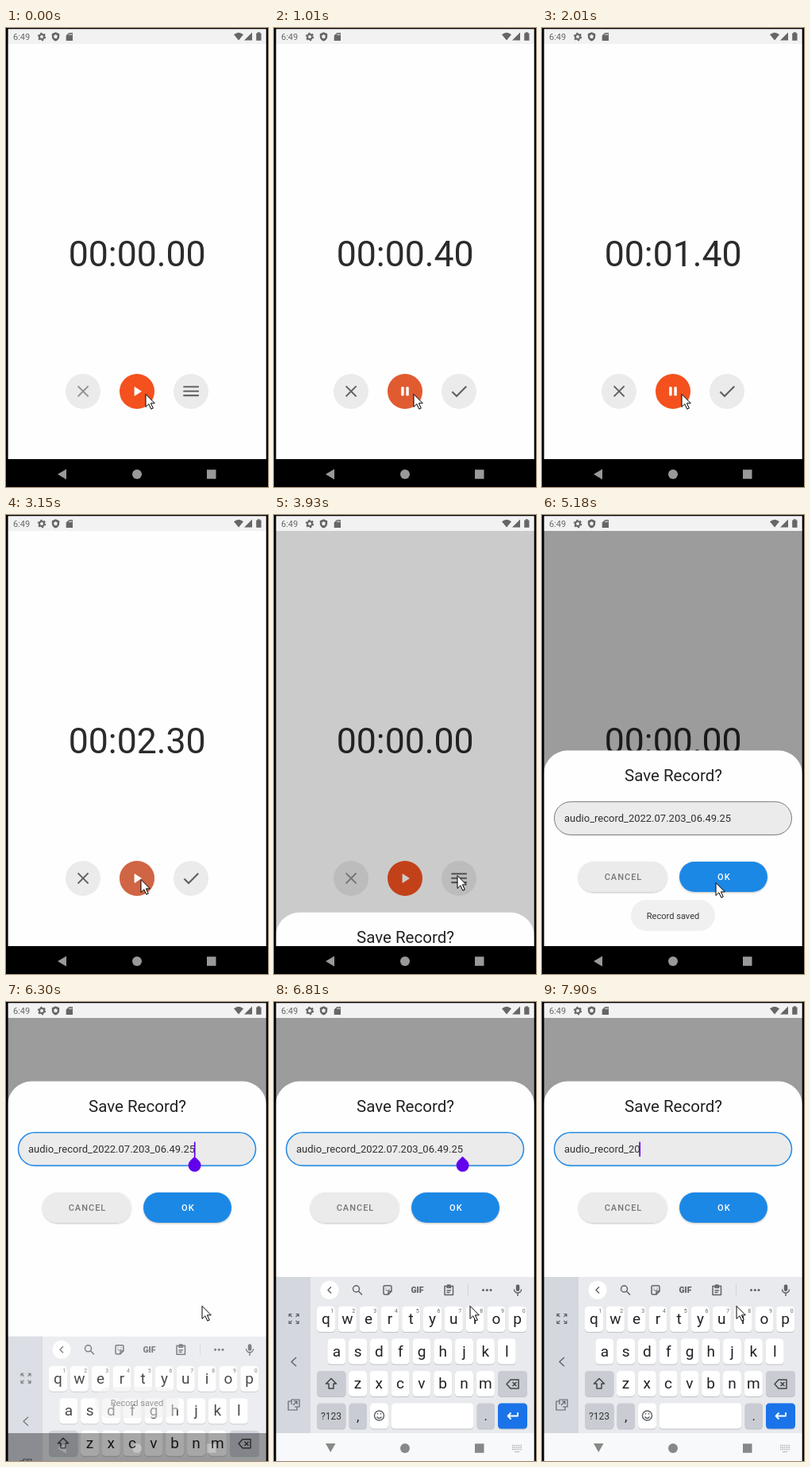
These frames come from a looping animation (330x576 px, 8 s). An HTML page:

```html
<!DOCTYPE html>
<html lang="en">
<head>
<meta charset="utf-8">
<title>Voice recorder</title>
<style>
html, body { margin: 0; width: 100%; height: 100%; overflow: hidden; background: #000; }
svg { display: block; width: 330px; height: 576px; font-family: Roboto, sans-serif; }
.mid { text-anchor: middle; }
.btn { font-size: 11px; font-weight: 500; letter-spacing: 1px; }
.line { fill: none; stroke: #5f6368; stroke-width: 1.5; stroke-linejoin: round; }
</style>
</head>
<body>
<svg viewBox="0 0 330 576">
  <defs>
    <filter id="soft" x="-10%" y="-20%" width="120%" height="150%">
      <feDropShadow dx="0" dy="1" stdDeviation="0.9" flood-opacity="0.25"/>
    </filter>
    <clipPath id="stage"><rect x="2" y="20" width="326" height="521"/></clipPath>
  </defs>
  <rect width="330" height="576" fill="#000"/>
  <g clip-path="url(#stage)">
    <rect x="2" y="20" width="326" height="521" fill="#fefefe"/>
    <text id="clock" class="mid" x="165.2" y="298.5" font-size="44.6" fill="#2b2b2b">00:00.00</text>

    <circle cx="97" cy="456" r="22" fill="#ebebeb"/>
    <path id="close" d="M90.6 449.4l13 13m0-13l-13 13" fill="none" stroke-width="2"/>
    <circle cx="165" cy="456" r="22" fill="#f4511e"/>
    <circle id="ripple" cx="165" cy="456" r="22" fill="#8a8a8a"/>
    <path id="play" d="M162 450.6v10.8l8.4-5.4z" fill="#fff" stroke="#fff" stroke-width=".8" stroke-linejoin="round"/>
    <g id="pause" fill="#fff">
      <rect x="160.2" y="450.3" width="3.5" height="11.2" rx="1.2"/>
      <rect x="166.3" y="450.3" width="3.5" height="11.2" rx="1.2"/>
    </g>
    <circle cx="233" cy="456" r="22" fill="#ebebeb"/>
    <path id="menu" d="M223.3 450.3h19.6m-19.6 5.4h19.6m-19.6 5.4h19.6" stroke="#666" stroke-width="2.1"/>
    <path id="check" d="M224.4 456.4l5.6 5.6 12.2-12.2" fill="none" stroke="#606060" stroke-width="2.1"/>

    <rect id="dim" x="2" y="20" width="326" height="521"/>

    <g id="sheet">
      <path d="M2 600V30.6A30 30 0 0 1 32 .6H298A30 30 0 0 1 328 30.6V600z" fill="#fefefe"/>
      <text class="mid" x="165.5" y="38.6" font-size="20.5" fill="#222">Save Record?</text>
      <rect id="field" x="15.5" y="64.8" width="299" height="41.6" rx="20.8" fill="#ebebeb"/>
      <text id="name" x="28" y="90.3" font-size="13" fill="#303030"></text>
      <g filter="url(#soft)">
        <rect x="46" y="140" width="111.5" height="38" rx="19" fill="#ebebeb"/>
        <rect x="173" y="140" width="111" height="38" rx="19" fill="#1e88e5"/>
      </g>
      <text class="mid btn" x="102.5" y="163.2" fill="#777">CANCEL</text>
      <text class="mid btn" x="229.3" y="163.2" fill="#fff">OK</text>
      <g id="caret" fill="#6200ee">
        <rect id="bar" x="-1.2" y="76.5" width="1.7" height="18.5"/>
        <path id="handle" d="M-.5 94.7l5.66 5.66a8 8 0 1 1 -11.32 0z"/>
      </g>
    </g>
  </g>

  <g id="status" fill="#666">
    <rect x="2" y="1" width="326" height="19" fill="#f2f2f2"/>
    <text x="9" y="15" font-size="11">6:49</text>
    <circle cx="45" cy="11" r="3" fill="none" stroke="#666" stroke-width="2"/>
    <circle cx="45" cy="11" r="4.5" fill="none" stroke="#666" stroke-width="1.5" stroke-dasharray="2.3 2.412"/>
    <path d="M62.5 5.3l4.7 2v3.4c0 2.7-2 5-4.7 5.8-2.7-.8-4.7-3.1-4.7-5.8V7.3z"/>
    <path d="M62.5 8l2.4 1.8-.8 3.2h-3.2l-.8-3.2z" fill="#f2f2f2"/>
    <path d="M79.3 6h4.7v10h-8.3V9.4z"/>
    <path d="M79.8 7.2v2m1.5-2v2m1.5-2v2" stroke="#f2f2f2" stroke-width=".8"/>
    <path d="M287 8.2q6-5 12 0l-6 7.3zM310 5.5v10h-10zM316.8 5.3h3v1.2h1.7v9.2h-6.3V6.5h1.6z"/>
  </g>

  <g id="keys"></g>

  <g id="nav">
    <rect x="2" y="541" width="326" height="35"/>
    <path d="M76 553.5v13l-11-6.5zM253 554.2h11.5v11.5h-11.5z" fill="#999"/>
    <circle cx="165" cy="560" r="6" fill="#999"/>
  </g>

  <g id="toast">
    <rect x="112" y="483" width="106" height="39" rx="19.5" fill="#f0f0f0"/>
    <text id="note" class="mid" x="165" y="507" font-size="11.1" fill="#333">Record saved</text>
  </g>
  <path id="pointer" d="M.5.5v16l3.8-3.6 3 6.3 2.5-1.1-2.9-6.2h4.9z" fill="#fff" stroke="#000" stroke-width="1"/>
  <path d="M0 0h330v576h-2.3V1.3H2.6V576H0z"/>
</svg>
<script>
const $ = id => document.getElementById(id);
const show = (id, on) => $(id).setAttribute('visibility', on ? 'visible' : 'hidden');
const fade = (id, a) => $(id).setAttribute('opacity', Math.max(0, Math.min(1, a)));
const move = (id, x, y) => $(id).setAttribute('transform', `translate(${x} ${y})`);

// Keyboard, laid out at its resting place
const key = (x, y, w, fill = '#fff') =>
  `<rect x="${x}" y="${y - 15.5}" width="${w}" height="32.5" rx="4.5" fill="#bfc2c8"/>` +
  `<rect x="${x}" y="${y - 16}" width="${w}" height="32" rx="4.5" fill="${fill}"/>`;
const label = (s, x, y, size = 19, fill = '#202124', extra = '') =>
  `<text class="mid" x="${x}" y="${y}" font-size="${size}" fill="${fill}" ${extra}>${s}</text>`;
const line = (d, extra = '') => `<path class="line" d="${d}" ${extra}/>`;

function letters(row, x0, y, hints) {
  return [...row].map((c, i) => {
    const x = x0 + 26.8 * i;
    return key(x - 11.5, y, 23) + label(c, x, y + 6) +
      (hints ? label((i + 1) % 10, x + 8, y - 8, 7, '#666') : '');
  }).join('');
}

function keyboard() {
  const grey = '#c9ccd3', thin = 'style="stroke-width:1.2"', dark = 'style="stroke:#444"';
  const dot = x => `<circle cx="${x}" cy="361.5" r="1.5" fill="#5f6368"/>`;
  return [
    '<rect x="2" y="345" width="326" height="240" fill="#e8eaed"/>',
    '<rect x="2" y="345" width="44" height="240" fill="#d4d7de"/>',
    line('M19 395v-3.5h3.5M27.5 391.5H31v3.5M31 400v3.5h-3.5M22.5 403.5H19V400M19.5 392l3 3M30.5 392l-3 3M30.5 403l-3-3M19.5 403l3-3', thin),
    line('M28 446l-6 5.5 6 5.5'),
    line('M22 501h-4v11h11v-4M22 505v-6h10v9h-6M24 506l5-5m-4 0h4v4', thin),
    '<circle cx="70" cy="361.5" r="11.5" fill="#fff"/>',
    line('M72 357.5l-4 4 4 4'),
    '<circle class="line" cx="103.5" cy="360" r="4"/>', line('M106.5 363l4.5 4.5'),
    line('M139.5 356h7q1.5 0 1.5 1.5v5.5l-4 4h-4.500q-1.500 0-1.500-1.500v-8q0-1.500 1.500-1.500zM148 363h-2.500q-1.500 0-1.500 1.500v2.500'),
    line('M140.5 361q2.5 3 5 0M141 358.5v1M145 358.5v1', 'style="stroke-width:1"'),
    label('GIF', 180.5, 365.3, 10.5, '#5f6368', 'font-weight="900"'),
    line('M215 356.5h10.5v11H215zM218 356.5v2h4.5v-2M217.5 362h5.5M217.5 364.5h4'),
    '<rect x="218" y="354.5" width="4.5" height="3" fill="#5f6368"/>',
    '<path d="M244.5 354v15" stroke="#d0d3d8"/>',
    dot(263.5), dot(268.3), dot(273),
    '<rect x="304.8" y="354.5" width="4.5" height="8.5" rx="2.25" fill="#5f6368"/>', line('M302.5 360.5a4.5 4.5 0 0 0 9 0M307 365v4'),
    letters('qwertyuiop', 65.5, 398, true),
    letters('asdfghjkl', 78.8, 438.5),
    key(54, 479, 36.5, grey), line('M72 472.5l-6.5 6.5h3.5v6h6v-6h3.5z', dark),
    letters('zxcvbnm', 105.5, 479),
    key(282, 479, 37, grey), line('M298 474h10v11h-10l-5-5.5zM300.5 477l5 5m0-5l-5 5', dark),
    key(54, 519.5, 36.5, grey), label('?123', 72, 524, 12, '#333'),
    key(94.5, 519.5, 22.5, grey), label(',', 105.7, 526, 17),
    key(121, 519.5, 23), '<circle class="line" cx="132.5" cy="519" r="6"/>', line('M129.5 520.5q3 4 6 0M130.5 516v1.5M134.5 516v1.5'),
    key(147.5, 519.5, 104),
    key(255.5, 519.5, 22.5, grey), label('.', 266.7, 525, 17),
    key(282, 519.5, 37, '#1a73e8'),
    line('M307 515v4.5h-12.5m4-4l-4 4 4 4', 'style="stroke:#fff;stroke-width:1.8"'),
    '<rect x="2" y="541" width="326" height="60" fill="#f8f9fa"/>',
    '<path d="M65 554h12.5l-6.25 11zM253 554.2h11.5v11.5h-11.5z" fill="#888"/><circle cx="165" cy="560" r="6" fill="#888"/>',
    '<g stroke="#b0b0b0"><path d="M300 556.5h12m-12 2.5h12m-12 2.5h12" stroke-width="1.5" stroke-dasharray="1.5 1.1"/><path d="M303 564.5h6"/></g>'
  ].join('');
}
$('keys').innerHTML = keyboard();

// The picture refreshes in bursts: start and number of 120 ms ticks
const bursts = [[0, 1], [650, 5], [1270, 4], [1770, 5], [2400, 2], [2670, 7], [3530, 1],
  [3930, 2], [4200, 2], [4480, 1], [5180, 3], [5820, 2], [6180, 2], [6440, 4],
  [6960, 2], [7510, 3], [7900, 1]];
function snap(t) {
  const [start, n] = bursts.filter(b => b[0] <= t).pop();
  return start + 120 * Math.min(n - 1, Math.floor((t - start) / 120));
}

// Pointer stops: time, x, y
const stops = [[0, 176, 459], [2250, 172, 458], [2400, 166, 457], [2520, 170, 457],
  [3270, 195, 455], [3390, 224, 452], [3530, 231, 452], [5180, 219, 461], [5300, 225, 455],
  [5420, 232, 447], [5820, 240, 413], [5940, 247, 381], [7510, 245, 381]];

const fileName = 'audio_record_2022.07.203_06.49.25';
const press = e => e < 0 || e > 480 ? 0 : 0.35 * Math.min((e + 80) / 320, (480 - e) / 240);

function sheetTop(t) {
  if (t < 3930) return 600;
  if (t >= 6300) return 99;
  return 295 + 246 * Math.max(0, 1 - (t - 3860) / 403);
}

function nameLength(t) {
  if (t < 6960) return 33;
  if (t < 7400) return 32;
  return 15 + Math.ceil((7900 - t) / 30);
}

function draw(t) {
  const recording = t >= 650 && t < 2910;
  const open = t >= 650 && t < 3930;
  const ticks = open ? Math.max(0, Math.floor((Math.min(t, 2910) - 610) / 100)) : 0;
  $('clock').textContent = `00:0${Math.floor(ticks / 10)}.${ticks % 10}0`;
  $('close').setAttribute('stroke', open ? '#606060' : '#929292');
  show('play', !recording);
  show('pause', recording);
  show('menu', !open);
  show('check', open);
  fade('ripple', press(t - 650) + press(t - 2910));

  fade('dim', t < 3930 ? 0 : t < 4050 ? 0.2 : 0.39);
  move('sheet', 0, sheetTop(t));

  const focus = t >= 6180;
  $('field').setAttribute('stroke', focus ? '#2b8ee6' : '#777');
  $('field').setAttribute('stroke-width', focus ? 1.6 : 1);
  $('name').textContent = fileName.slice(0, nameLength(t));
  move('caret', 28 + $('name').getComputedTextLength(), 0);
  show('bar', focus && (t < 6800 || t >= 6960));
  show('handle', focus && t < 7080);
  fade('handle', t < 6960 ? 1 : 0.5);

  const u = Math.max(0, Math.min(1, (t - 6180) / 400));
  move('keys', 0, 218 * (1 - u) ** 3);
  fade('keys', u * 2.7);
  fade('nav', 1 - u * 2.7);

  fade('toast', t < 4050 ? 0 : t < 6300 ? 0.03 + (t - 4050) / 280 : t < 6440 ? 0.5 : 0);
  fade('note', t < 4480 ? 0.9 : 1);

  const [, x, y] = stops.filter(s => s[0] <= t).pop();
  move('pointer', x - 0.5, y);
}

function loop() {
  draw(snap(performance.now() % 8000));
  requestAnimationFrame(loop);
}
loop();
</script>
</body>
</html>
```
